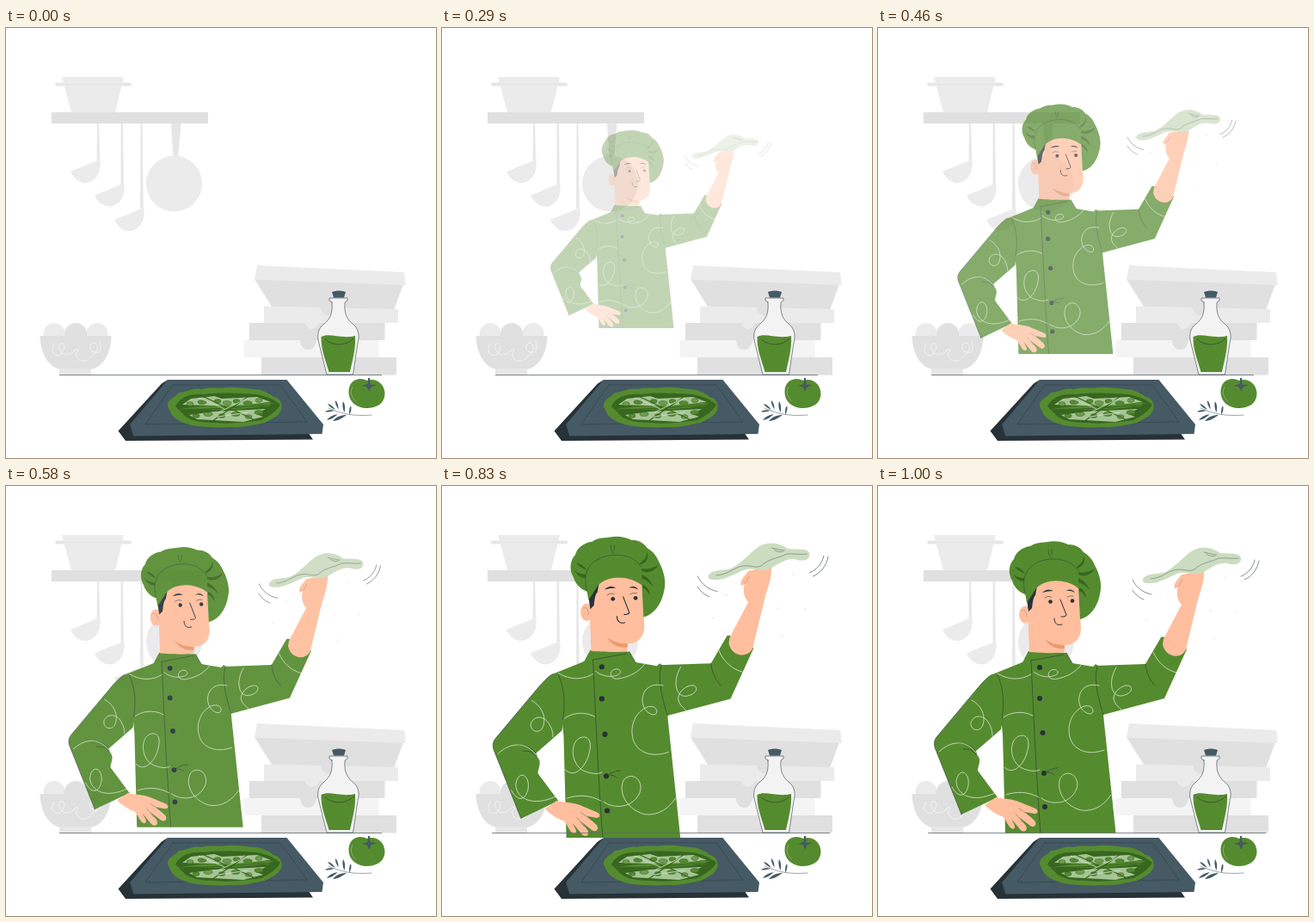
These frames come from a looping animation (500x500 px, 1040 ms). An HTML page:

```html
<!DOCTYPE html>
<html lang="en">
<head>
<meta charset="utf-8">
<title>Chef</title>
<style>
html, body { margin: 0; width: 100%; height: 100%; overflow: hidden; background: #fff; }
svg { display: block; width: 100vw; height: 100vh; }
.g1 { fill: #ebebeb; } .g2 { fill: #e0e0e0; } .g3 { fill: #e6e6e6; } .g4 { fill: #f4f4f4; }
.green { fill: #558b2f; } .deep { fill: #37661f; } .ink { fill: #263238; } .slate { fill: #455a64; }
.skin { fill: #ffbe9d; } .pale { fill: #a6c595; } .dough { fill: #cbdcc0; }
.line { fill: none; stroke: #263238; stroke-width: .55; stroke-linecap: round; stroke-linejoin: round; }
.swirl { fill: none; stroke: #e3ebdd; stroke-width: .75; stroke-linecap: round; }
</style>
</head>
<body>
<svg viewBox="0 0 500 500">
  <defs>
    <path id="ladle" class="g1" d="M75 167L109 153C112 166 105 178 94 180C85 181 78 174 75 167Z"/>
    <path id="leaf" class="slate" d="M0 0C3-1.600 7-1.600 11 0C7 1 3 1.500 0 0Z"/>
    <path id="flask" d="M379 319L376 317V314H397V317L394 319C393 333 397 339 403 344C411 350 411 359 409 366L403.500 403H373L364 367C361 357 363 349 370 344C377 338 380 332 379 319Z"/>
  </defs>

  <!-- kitchen -->
  <path class="g1" d="M65 57H137L127 98H76Z"/>
  <rect class="g3" x="57" y="63.500" width="89" height="4" rx="2"/>
  <path class="g1" d="M67 62H135.500L134.500 68H68.500Z"/>
  <path d="M69 65.500H134" stroke="#dedede" stroke-width=".7"/>
  <path class="g2" d="M53 98H235V111H53Z"/>
  <path class="g1" d="M106 111H108L109.500 155H105.500ZM133.500 111H136L137 182H133.500ZM156.500 111H158.500L160 210H156Z"/>
  <path d="M107 111V153M135 111V181M157.500 111V209" stroke="#e0e0e0" stroke-width=".7"/>
  <use href="#ladle"/><use href="#ladle" x="28" y="27.500"/><use href="#ladle" x="51" y="56"/>
  <path class="g3" d="M192 111H203.500L200 151H194.500Z"/>
  <circle class="g1" cx="195.500" cy="181" r="32.500"/>

  <circle class="g1" cx="56" cy="355.500" r="12.500"/>
  <circle class="g1" cx="106" cy="355.500" r="12.500"/>
  <circle class="g2" cx="81" cy="356" r="13"/>
  <path class="g2" d="M39.500 358H122.500C122 379 112 396 97 397H65C50 396 40 379 39.500 358Z"/>
  <path class="g3" d="M62 396H99V403.500H62Z"/>
  <path class="swirl" style="stroke:#fafafa" d="M56 367C50 377 58 384 64 379C72 370 66 364 62 368C59 376 70 385 79 376C83 371 86 374 82 378C80 387 93 392 100 381C108 376 108 367 102 366C95 368 97 379 107 377C110 376 111 371 109 364"/>

  <path class="g2" d="M289 292L462 298L451 328L309 324Z"/>
  <path class="g1" d="M292 276L463 284L465 299L289 292.500Z"/>
  <path class="g1" d="M300 323.500L456 327V343H300Z"/>
  <path class="g2" d="M366 325C367 337 380 337 384 326Z"/>
  <path class="g2" d="M283 343H440.500V363H283Z"/>
  <path class="g1" d="M348 343C350 352 361 352 364 343Z"/>
  <path class="g4" d="M276.500 363H433.500V383H276.500Z"/>
  <path class="g2" d="M342 363C343 378 359 378 361 363Z"/>
  <path class="g2" d="M297 383H454V403.500H297Z"/>

  <!-- chef -->
  <g id="chef">
    <g class="green">
      <path d="M175 192L219 194L226 206L250 210L253 207L256 209L262 266L276.500 403.500H148L145 290L139 219L168 205Z"/>
      <path d="M252 209L311 207L329 176C332 173 357 186 359 190L333 247L262 266Z"/>
      <path d="M168 205L133 219C127 222 121 229 115 236L68 292C65 296 65 300 66 304L97 382L139 362L116 331C116 326 120 320 117 315L113 309L143 283L150 245Z"/>
    </g>
    <path class="skin" d="M124 371L137 362C147 364 158 364 166 368L183 375C188 378 185 382 181 381L171 379L182 389C186 394 181 398 177 395L164 385L172 395C175 401 169 404 165 399L155 387L159 395C160 400 155 400 152 395L146 385C138 382 130 377 124 371Z"/>
    <path class="line" d="M164 375L176 383M160 381L168 391" stroke-opacity=".6"/>

    <path class="line" d="M178 203L216 196M178 203C180 245 184 340 189 403M139 220C146 234 147 255 144 270M255 210C250 225 257 250 262 266M311 207C312 217 316 226 322 232M93 299C104 299 112 304 115 311M99 306C107 305 111 308 114 312M196 332C201 329 205 328 209 328M197 333C201 333 203 334 205 336M133 219C127 222 121 229 115 236L68 292C65 296 65 300 66 304L97 382M219 194L226 206"/>
    <g class="swirl">
      <path d="M139 218C152 226 166 226 178 219M181 216C192 225 208 222 209 217C209 212 199 212 198 219C199 226 206 225 213 223C224 220 232 214 237 207"/>
      <path d="M257 232C240 228 232 240 234 252C236 264 250 269 250 261C249 254 239 254 233 260C219 270 218 296 232 305C242 312 255 310 263 307"/>
      <path d="M277 211C268 225 270 245 283 244C296 242 297 233 291 232C284 231 274 239 274 247C275 254 280 257 283 260M320 193C325 205 335 214 347 217"/>
      <path d="M146 269C153 264 166 260 180 267M147 327C158 339 174 320 175 300C175 287 163 288 158 296C152 307 157 325 170 329C178 332 184 332 188 330"/>
      <path d="M149 359C160 355 175 355 187 362M190 363C202 372 224 370 231 352C235 337 221 329 213 338C206 350 214 371 236 377C251 379 263 371 271 359"/>
      <path d="M109 249C122 256 126 270 121 280C116 287 107 283 108 275C111 266 123 265 129 276C132 281 133 286 133 290M71 309C83 297 101 294 113 309M86 350C98 372 109 350 104 338C100 329 92 333 91 344C92 360 111 369 136 357"/>
    </g>
    <g class="ink">
      <circle cx="188" cy="211" r="3"/><circle cx="188" cy="247" r="3"/><circle cx="191.500" cy="287" r="3"/><circle cx="193" cy="334" r="3"/><circle cx="194" cy="373" r="3"/>
    </g>

    <!-- head -->
    <path class="skin" d="M176 193L174 138C176 122 186 112 200 110C220 107 232 112 233 120L236 165C236 177 229 185 217 185V193C208 195 186 194 176 193Z"/>
    <path d="M194 178C201 183 209 185 217 185V189C207 190 199 186 194 178Z" fill="#eb996e"/>
    <ellipse class="skin" cx="171" cy="149.500" rx="7" ry="10"/>
    <path class="line" d="M167 145C170 143 173 146 173 152" stroke-opacity=".4"/>
    <path class="ink" d="M175 146L173 132L185 116L183 127C180 130 180 136 179 142Z"/>
    <path class="green" d="M173 136C172 131 172 128 171 126C163 123 158 117 156 110C151 102 152 91 158 85C160 77 168 71 177 70C184 65 193 66 197 65C206 63 215 65 221 68C229 68 235 71 239 77C246 81 250 87 252 92C257 101 260 112 259 120C257 138 248 152 235 155L233 119C218 107 194 108 184 119Z"/>
    <path class="line" d="M171 125C168 112 170 104 174 98C186 81 222 80 232 98M198 74C198 78 199 81 201 83M202 74V80" stroke-opacity=".8"/>
    <g class="deep">
      <path d="M159 94C163 94 168 97 171 102C167 100 162 98 159 94ZM157 102C161 106 166 107 170 107V111C165 111 160 108 157 102Z"/>
      <path d="M231 94C237 90 239 86 239 81C242 89 237 95 231 96ZM233 100C240 102 247 99 252 96C248 104 239 106 233 103ZM233 107C240 110 244 115 246 121C241 115 237 113 233 112ZM234 118C240 121 242 126 242 130C239 125 237 123 234 122Z"/>
    </g>
    <circle class="ink" cx="200.500" cy="134.500" r="2.300"/><circle class="ink" cx="226" cy="133.500" r="2.300"/>
    <path class="line" d="M194 130Q198 127 202 129M220 129Q224 127 227 128"/>
    <path class="line" style="stroke-width:1" d="M212 132L219 150Q218 152.500 213 152M205 154C205 160 209 163 214 161"/>
    <path class="ink" d="M191 124Q197 118 204 122Q197 122 191 124ZM218 122Q225 118 229 124Q224 121 218 122Z"/>

    <!-- raised arm and dough -->
    <path class="skin" d="M332 178L353 138C347 131 347 124 349 117C345 122 343 118 346 112L353 103L379 98C380 109 375 122 372 132L358 190C353 202 334 200 331 184Z"/>
    <path class="line" d="M349 117L354 109" stroke-opacity=".4"/>
    <path class="dough" d="M308 108C312 101 325 103 334 100C350 92 359 76 371 73C380 70 389 72 398 78C410 79 421 77 422 84C423 90 415 93 407 90C395 88 388 95 378 100C370 106 360 98 348 102C338 106 325 114 315 113C309 113 307 111 308 108Z"/>
    <path class="line" stroke-opacity=".65" d="M317 108C330 107 336 100 344 98C355 95 361 101 368 97C376 89 386 89 396 84C404 83 412 85 419 84M379 77C385 78 389 80 394 80M382 79C386 82 389 82 392 81"/>
    <path class="line" d="M296 109C300 118 308 124 318 126M296 121C300 127 304 130 309 132M443 87C441 97 435 105 426 109M438 86C436 95 430 102 422 105"/>
    <path d="M404 107h0M387 145h0M417 146h0M391 177h0M328 130h0M313 156h0" stroke="#ddd" stroke-width="1.600" stroke-linecap="round"/>
  </g>

  <path id="edge" stroke="#606a6e" stroke-width=".8"/>

  <!-- bottle -->
  <use href="#flask" fill="#f3f3f3"/>
  <use href="#flask" class="line"/>
  <path class="slate" d="M379 307C384 305 390 305 395 307L393 313.500H381Z"/>
  <path class="green" d="M366.500 359C376 354 390 362 406 358C407 372 403 386 400 400H375.500C372 387 366 374 366.500 359Z"/>
  <path class="line" d="M371 362C380 370 396 370 404 361"/>

  <!-- tomato and herb -->
  <path class="green" d="M420 410C430 406 441 414 440.500 426C440 437 430 442 420 442C407 442 398 434 398.500 422C399 409 411 405 420 410Z"/>
  <path d="M403 417C399 425 403 431 407 434" fill="none" stroke="#a6c595" stroke-width=".6"/>
  <path class="slate" d="M421 407H423L423.500 414.500L431 415L424.500 417.500L422 423L420 417.500L414 416L420.500 414Z"/>
  <path class="line" style="stroke:#455a64" d="M375 442C387 447 399 452 425 450"/>
  <use href="#leaf" transform="translate(374 437) rotate(38)"/>
  <use href="#leaf" transform="translate(383 433) rotate(72)"/>
  <use href="#leaf" transform="translate(392 434) rotate(84) scale(1.200)"/>
  <use href="#leaf" transform="translate(401 439) rotate(100)"/>
  <use href="#leaf" transform="translate(371 446) rotate(-6)"/>
  <use href="#leaf" transform="translate(373 456) rotate(-28) scale(1.300)"/>
  <use href="#leaf" transform="translate(380 457) rotate(-24) scale(1.600)"/>

  <!-- board and pizza -->
  <path class="ink" d="M188 409L181 413.500L130.500 468.500L139 480L357 478.500L351 470L150 465Z"/>
  <path class="slate" d="M188 409H326.500L369 461L367.500 472L148 474.500L144 461Z"/>
  <path class="line" stroke-opacity=".7" d="M194 415H319L350 458L162 461L194 415M144 461L148 474"/>
  <path class="green" d="M188 440C187 432 196 430 201 424C210 424 216 418 227 420C238 417 247 420 257 418C270 417 280 420 290 420C299 421 307 425 311 429C319 430 322 438 320 444C317 452 308 455 301 459C288 461 277 465 262 464C247 465 234 464 222 463C208 461 198 456 193 450Z"/>
  <path class="deep" d="M197 440C203 428 216 425 231 426C250 423 275 425 291 426C303 428 312 432 319 438C313 448 304 452 297 456C280 458 262 461 244 459C226 459 211 456 206 449Z"/>
  <g class="pale">
    <path d="M205 438L215 431L242 428L251 431L292 429L308 435L262 440L236 439Z"/>
    <path d="M213 450L242 446L302 443L291 449L299 452L276 458L241 456L222 455Z"/>
  </g>
  <g id="toppings"></g>
  <path class="green" d="M200 444C230 437 275 440 312 436C290 445 235 444 200 444Z"/>
  <path d="M200 443C235 445 270 440 316 438M226 427L256 441M284 427L240 457M262 443L292 457" fill="none" stroke="#37661f" stroke-width="1.200"/>
  <path d="M224 430L254 443M282 430L247 447M246 452L282 447" fill="none" stroke="#d5e3cc" stroke-width=".8"/>
</svg>
<script>
const chef = document.getElementById('chef');
const edge = document.getElementById('edge');
const spots = [[214, 437], [228, 435], [246, 434], [257, 436], [268, 434], [281, 436], [294, 433], [303, 438],
  [221, 451], [235, 449], [251, 451], [267, 449], [282, 452], [294, 447]];
document.getElementById('toppings').innerHTML = spots.map(([x, y], i) =>
  `<ellipse cx="${x}" cy="${y}" rx="${4 + i % 2}" ry="2.3" fill="${i % 3 ? '#558b2f' : '#6f9f4d'}" stroke="#37661f" stroke-width=".6"/>`).join('');

const LOOP = 1040, FPS = 24;
const bez = (a, b, s) => 3 * (1 - s) ** 2 * s * a + 3 * (1 - s) * s * s * b + s ** 3;

// cubic-bezier(.36, -.01, .5, 1.38)
function ease(x) {
  if (x >= 1) return 1;
  let lo = 0, hi = 1;
  for (let i = 0; i < 24; i++) {
    const mid = (lo + hi) / 2;
    if (bez(.36, .5, mid) < x) lo = mid; else hi = mid;
  }
  return bez(-.01, 1.38, lo);
}

function draw(now) {
  const step = Math.floor((now % LOOP + 4) * FPS / 1000);
  const p = ease((step + .6) / FPS);
  const scale = .5 + p / 2;
  chef.setAttribute('opacity', step < 3 ? 0 : Math.min(1, p));
  chef.setAttribute('transform', `translate(255 233.75) scale(${scale}) translate(-255 -233.75)`);
  edge.setAttribute('d', step < 16 ? 'M62 403.5H437' : 'M58 403.5H451');
}

const start = performance.now();
function tick() {
  draw(performance.now() - start);
  requestAnimationFrame(tick);
}
tick();
</script>
</body>
</html>
```
